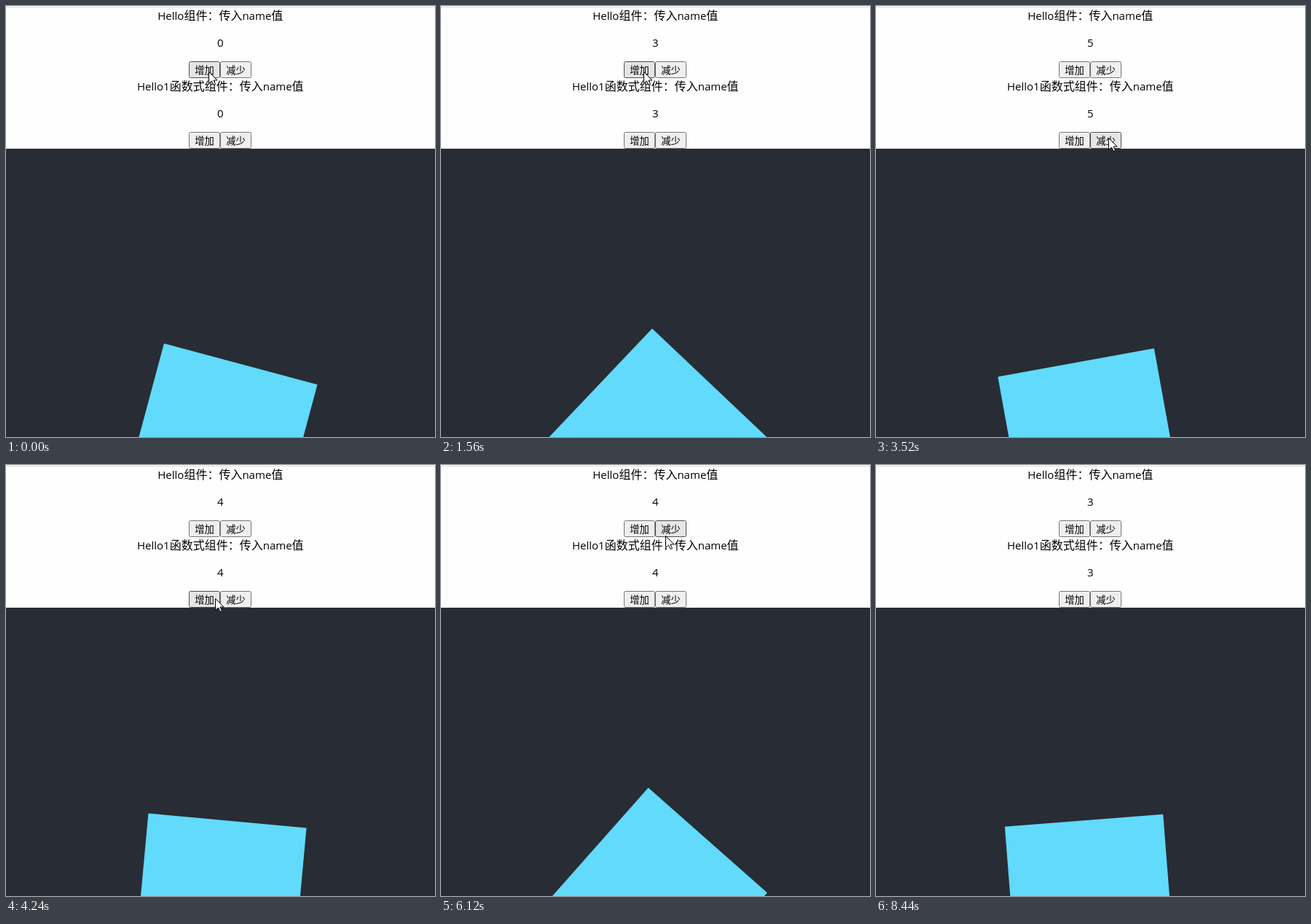
These frames come from a looping animation (589 px wide and 592 px high, 8540 ms). An HTML page with a canvas:

```html
<!DOCTYPE html>
<html lang="zh-CN">
<head>
<meta charset="utf-8">
<style>
  html, body { margin: 0; width: 100%; height: 100%; overflow: hidden; background: #fff; }
  canvas { display: block; }
</style>
</head>
<body>
<canvas id="stage" width="589" height="592"></canvas>
<script>
const ctx = document.getElementById('stage').getContext('2d');
const LOOP = 8540;
const REFRESH = LOOP / 63;
const CENTER = 294.3;
const CJK = '"Noto Sans CJK SC", "Noto Sans CJK", sans-serif';
const LATIN_FONT = '15px "Open Sans", "Noto Sans", sans-serif';
const CJK_FONT = '16px ' + CJK;
const ARROW = new Path2D('M0 0V16L4 12.5L6.5 18L9 17L6.5 11.5H11.5Z');

// Pointer timing: travel to a button, wait, then press at a steady pace.
const TRAVEL = 500;
const WAIT = 700;
const PRESS_GAP = 380;
const VISITS = [
  { arrive: -320, x: 278, y: 90, presses: 5, change: 1 },
  { arrive: 2800, x: 319, y: 181, presses: 1, change: -1 },
  { arrive: 4050, x: 287, y: 183, presses: 1, change: 1 },
  { arrive: 5300, x: 308, y: 97, presses: 2, change: -1 }
];
const EXIT = { arrive: 7200, x: 474, y: 250 };

const BUTTONS = [76, 173].flatMap(y => [
  { x: 251, y, label: '增加' },
  { x: 294, y, label: '减少' }
]);

const clamp = (v, low, high) => Math.min(high, Math.max(low, v));

function countAt(t) {
  return VISITS.reduce((sum, { arrive, presses, change }) => {
    const done = Math.floor((t - arrive - WAIT) / PRESS_GAP) + 1;
    return sum + change * clamp(done, 0, presses);
  }, 0);
}

function pointerAt(t) {
  if (t >= EXIT.arrive) return null;
  let { x, y } = VISITS[0];
  for (const stop of [...VISITS, EXIT]) {
    const p = clamp((t - stop.arrive) / TRAVEL + 1, 0, 1);
    const ease = p * p * (3 - 2 * p);
    x += (stop.x - x) * ease;
    y += (stop.y - y) * ease;
  }
  return { x: Math.round(x), y: Math.round(y) };
}

// Latin and Chinese runs use separate fonts, centred as one line.
function drawLine(text, baseline) {
  const runs = text.match(/[ -~]+|[^ -~]+/g).map(part => {
    const font = /^[ -~]/.test(part) ? LATIN_FONT : CJK_FONT;
    ctx.font = font;
    return { part, font, width: ctx.measureText(part).width };
  });
  let x = CENTER - runs.reduce((sum, run) => sum + run.width, 0) / 2;
  ctx.fillStyle = '#000';
  ctx.textAlign = 'left';
  for (const run of runs) {
    ctx.font = run.font;
    ctx.fillText(run.part, x, baseline);
    x += run.width;
  }
}

function drawButton({ x, y, label }, pointer) {
  const hover = pointer && pointer.x >= x && pointer.x < x + 43 &&
                pointer.y >= y && pointer.y < y + 23;
  ctx.beginPath();
  ctx.roundRect(x + 0.5, y + 0.5, 42, 22, 2);
  ctx.fillStyle = hover ? '#e5e5e5' : '#efefef';
  ctx.strokeStyle = hover ? '#4f4f4f' : '#767676';
  ctx.fill();
  ctx.stroke();
  ctx.fillStyle = '#000';
  ctx.font = '13.333px ' + CJK;
  ctx.textAlign = 'center';
  ctx.fillText(label, x + 21.5, y + 17);
}

function drawSpinner(t) {
  ctx.save();
  ctx.translate(294, 597);
  ctx.rotate((15 + 19.1 * t / 1000) * Math.PI / 180);
  ctx.fillStyle = '#61dafb';
  ctx.fillRect(-109, -109, 218, 218);
  ctx.restore();
}

function drawPointer({ x, y }) {
  ctx.save();
  ctx.translate(x + 0.5, y + 0.5);
  ctx.fillStyle = '#fff';
  ctx.strokeStyle = '#000';
  ctx.fill(ARROW);
  ctx.stroke(ARROW);
  ctx.restore();
}

function fillBand(color, y, height) {
  ctx.fillStyle = color;
  ctx.fillRect(0, y, 589, height);
}

function draw(t) {
  const count = String(countAt(t));
  const pointer = pointerAt(t);
  fillBand('#fefefe', 0, 196);
  fillBand('#dcdcdc', 1, 1);
  fillBand('#282c34', 196, 396);
  drawSpinner(t);
  drawLine('Hello组件：传入name值', 19);
  drawLine(count, 56);
  drawLine('Hello1函数式组件：传入name值', 116);
  drawLine(count, 153);
  BUTTONS.forEach(button => drawButton(button, pointer));
  if (pointer) drawPointer(pointer);
}

const start = performance.now();
function frame() {
  const t = (performance.now() - start) % LOOP;
  draw(Math.floor(t / REFRESH) * REFRESH);
  requestAnimationFrame(frame);
}
frame();
</script>
</body>
</html>
```
